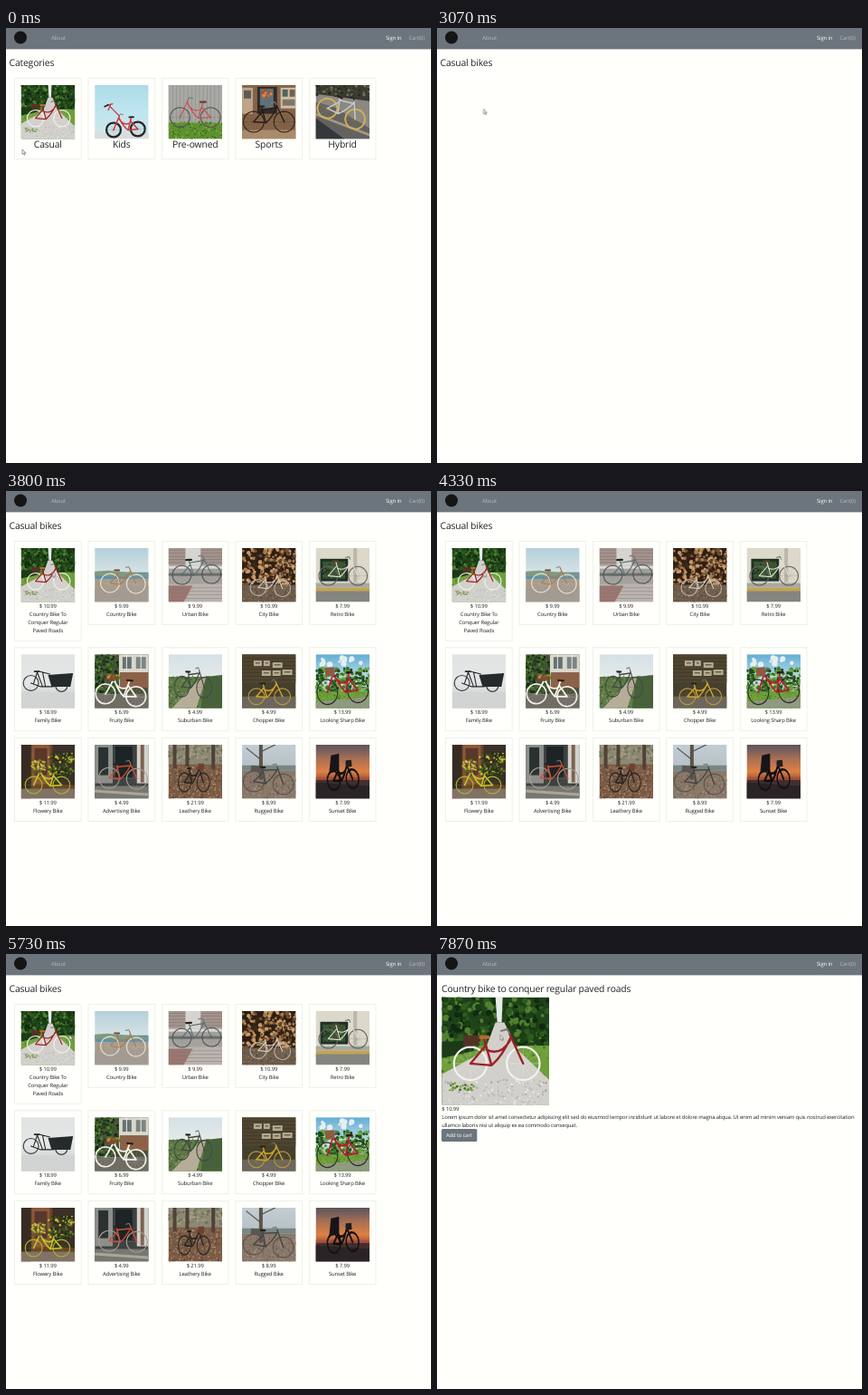
An HTML page that plays this animation: 470x480 px, repeating every 8000 ms.

```html
<!DOCTYPE html>
<html lang="en">
<head>
<meta charset="utf-8">
<title>Bike shop</title>
<style>
html, body { margin: 0; width: 100%; height: 100%; overflow: hidden; background: #fffffb; }
#stage { display: block; width: 470px; height: 480px; }
text { font: 5.92px "Open Sans", "Noto Sans", sans-serif; letter-spacing: -.025em; fill: #212529; text-rendering: geometricPrecision; }
.big { font-size: 10.4px; letter-spacing: -.017em; }
.mid { text-anchor: middle; }
.dim { fill: #b5babe; }
.lit { fill: #fff; }
.card { fill: none; stroke: #efefec; }
.page { visibility: hidden; animation: 8s step-end infinite; }
#home { animation-name: home; }
#title { animation-name: title; }
#list { animation-name: list; }
#item { animation-name: item; }
#cursor { animation: move 8s linear infinite; }
@keyframes home { 0% { visibility: visible } 38.375%, 100% { visibility: hidden } }
@keyframes title { 0% { visibility: hidden } 38.375% { visibility: visible } 74.125%, 100% { visibility: hidden } }
@keyframes list { 0% { visibility: hidden } 40% { visibility: visible } 74.125%, 100% { visibility: hidden } }
@keyframes item { 0% { visibility: hidden } 74.125%, 100% { visibility: visible } }
@keyframes move {
  0%, .875% { transform: translate(18px, 134px); animation-timing-function: ease-in-out }
  11.625%, 60% { transform: translate(51.5px, 89.5px); animation-timing-function: ease-in-out }
  70%, 100% { transform: translate(70px, 89.5px) }
}
</style>
</head>
<body>
<svg id="stage" viewBox="0 0 470 480">
  <rect width="470" height="480" fill="#fffffb"/>
  <rect width="470" height="23.4" fill="#6c757d"/>
  <circle cx="16" cy="10.5" r="7" fill="#151518"/>
  <text class="dim" x="50" y="13.3">About</text>
  <text class="lit" x="420" y="13.3">Sign in</text>
  <text class="dim" x="445.5" y="13.3">Cart(0)</text>
  <g id="home" class="page"><text class="big" x="3.5" y="42.4">Categories</text></g>
  <g id="title" class="page"><text class="big" x="3.5" y="42.4">Casual bikes</text></g>
  <g id="list" class="page"></g>
  <g id="item" class="page">
    <text class="big" x="5" y="42.4">Country bike to conquer regular paved roads</text>
    <text x="5.3" y="173">$ 10.99</text>
    <text x="5.3" y="182">Lorem ipsum dolor sit amet consectetur adipiscing elit sed do eiusmod tempor incididunt ut labore et dolore magna aliqua. Ut enim ad minim veniam quis nostrud exercitation</text>
    <text x="5.3" y="190.8">ullamco laboris nisi ut aliquip ex ea commodo consequat.</text>
    <rect x="5" y="193" width="39.3" height="14" rx="1.5" fill="#6c757d"/>
    <text class="lit" x="10" y="202.2">Add to cart</text>
  </g>
  <path id="cursor" d="M0 0V5.3L1.3 4.2 2.2 6.2 3.1 5.8 2.2 3.9H3.9Z" fill="#fff" stroke="#555" stroke-width=".6"/>
</svg>
<script>
const rect = (x, y, w, h, fill) => `<rect x="${x}" y="${y}" width="${w}" height="${h}" fill="${fill}"/>`;
const poly = (points, fill) => `<polygon points="${points}" fill="${fill}"/>`;
const line = (d, stroke, w) => `<path d="${d}" fill="none" stroke="${stroke}" stroke-width="${w}" stroke-linecap="round" stroke-linejoin="round"/>`;
const text = (x, y, s, cls) => `<text x="${x}" y="${y}" class="${cls}">${s}</text>`;

function fade(id, ...stops) {
  const steps = stops.map((c, i) => `<stop offset="${i / (stops.length - 1)}" stop-color="${c}"/>`).join('');
  return `<linearGradient id="${id}" x2="0" y2="1">${steps}</linearGradient>` + rect(0, 0, 60, 60, `url(#${id})`);
}

// Seeded dots for leaves, grass, gravel and logs.
function dots(n, x, y, w, h, r, colors) {
  let seed = n * 31 + x * 7 + y * 13 + 5, out = '';
  const rnd = () => (seed = (seed * 16807 + 11) % 2147483647) / 2147483647;
  rnd();
  for (let i = 0; i < n; i++) {
    out += `<circle cx="${(x + rnd() * w).toFixed(1)}" cy="${(y + rnd() * h).toFixed(1)}" r="${(r * (.5 + rnd() * .6)).toFixed(1)}" fill="${colors[i % colors.length]}"/>`;
  }
  return out;
}

const planks = (n, h, color) => Array.from({length: n}, (_, i) => rect(i * 60 / n, 0, .5, h, color)).join('');
const rows = (y, n, step, color) => Array.from({length: n}, (_, i) => rect(0, y + i * step, 60, .6, color)).join('');

// Bike from rear hub (x1, y1) to front hub (x2, y2), wheels of radius r; "tall" foreshortens it.
function bike(x1, y1, x2, y2, r, frame, tire, o = {}) {
  const s = Math.hypot(x2 - x1, y2 - y1) / 30, sy = s * (o.tall || 1);
  const turn = Math.atan2(y2 - y1, x2 - x1) * 180 / Math.PI;
  const R = r / s, seat = o.seat || '#2b211c', w = (o.w || 1.05) / s;
  const wheel = x => {
    let spokes = '';
    for (let a = 0; a < Math.PI; a += Math.PI / 6) {
      const dx = R * Math.cos(a), dy = R * Math.sin(a);
      spokes += `M${x - dx} ${-dy}L${x + dx} ${dy}`;
    }
    return `<g opacity=".35">${line(spokes, tire, .3)}</g><circle cx="${x}" r="${R}" fill="none" stroke="${tire}" stroke-width="${(o.tw || 1.1) / s}"/>`;
  };
  const top = o.diamond ? 'M8-12L22.5-14' : 'M9-8Q17-4 22.5-13';
  return `<g transform="translate(${x1} ${y1}) rotate(${turn}) scale(${s} ${x2 < x1 ? -sy : sy})">`
    + wheel(0) + wheel(30)
    + line(`M0 0L12 1L7.8-14M0 0L8.5-10M12 1Q18-4 23-15${top}M22.2-17L30 0`, frame, w)
    + line('M22.2-17L21-19.5L17.5-18.5', o.bar || '#777', 1)
    + line('M4.8-15H10', seat, 2)
    + (o.rack ? rect(-4, -16, 9, 6, o.rack) : '')
    + (o.basket ? rect(22, -20, 9, 7, o.basket) : '') + '</g>';
}

const leaf = ['#0f2a10', '#2c5c1e', '#527f30', '#1a3d15'];
const lawn = ['#3f7020', '#7fab42', '#5b912f'];

const casual = rect(0, 0, 60, 60, '#20431a') + dots(260, 0, 0, 60, 27, 1.7, leaf)
  + poly('30,0 34,0 33.5,14 31,14', '#e6ecea') + rect(0, 27, 60, 33, '#6f9f3c') + dots(90, 0, 27, 60, 18, 1, lawn)
  + poly('0,25 16,24 18,30 0,34', '#1d3a18')
  + poly('30,14 35,14 41,28 60,46 60,60 0,60 0,43 24,30', '#d2d0cb')
  + dots(160, 0, 46, 60, 14, .6, ['#aaa8a3', '#e9e8e4', '#bdbab4']) + dots(26, 4, 48, 14, 4, .7, lawn)
  + bike(16, 37, 45.5, 37, 9.2, '#9c2026', '#f3f2ee', {w: 1.2, seat: '#b86b2a', rack: '#513326'});

const kids = fade('kids', '#addbe8', '#bfe5ee', '#d1e8e9') + rect(0, 53, 60, 7, '#d7dedc')
  + bike(48, 49, 21, 50, 8, '#d7343d', '#24272a', {w: 1.5, tw: 2.3, seat: '#23252b'})
  + line('M27 34L17 24M13 23L20 21M15 28L18 21', '#c92e39', 1.2) + line('M11 24L15 22', '#252529', 1.7);

const owned = rect(0, 0, 60, 60, '#a8a9a5') + planks(14, 44, '#85877f') + rect(0, 42, 60, 18, '#5e9130')
  + dots(160, 0, 41, 60, 19, 1.1, lawn)
  + bike(47, 36, 13, 36, 11, '#cf474d', '#5b5550', {seat: '#703d30'});

const sports = rect(0, 0, 60, 60, '#846448') + rect(0, 3, 12, 29, '#bca58b') + rect(2, 6, 8, 9, '#5f5a50')
  + rect(17, 2, 22, 30, '#332a27') + rect(20, 4, 15, 22, '#627177') + rect(43, 3, 17, 23, '#cdbfaa')
  + rect(45, 5, 6, 8, '#53635f') + rect(53, 5, 6, 8, '#75604f') + rect(45, 16, 14, 7, '#827568')
  + dots(8, 23, 5, 9, 9, 2, ['#d13a22', '#e88536']) + rect(0, 50, 60, 10, '#a98a6b')
  + bike(13, 41, 47, 41, 11.5, '#241d1b', '#2d211c', {diamond: 1, w: 1.4});

const hybrid = rect(0, 0, 60, 60, '#8a8880') + poly('0,0 60,0 60,18 0,10', '#393b30')
  + dots(60, 0, 0, 60, 12, 1.6, ['#48472f', '#252923', '#777052']) + poly('0,19 20,24 60,48 60,60 0,60', '#63625e')
  + poly('0,37 32,60 0,60', '#34383a') + poly('0,31 60,54 60,57 0,34', '#a59a82')
  + bike(13, 26, 44, 38, 11, '#c4cac8', '#d2af59', {diamond: 1, tw: 1.8, w: 1.5, bar: '#1d2022'});

const country = fade('sky', '#b4d0dc', '#d9e4e4', '#d2d0c4') + rect(0, 27, 60, 8, '#5f90a8') + poly('0,26 15,25 60,29 60,32 0,31', '#7f9a84')
  + poly('0,35 60,34 60,60 0,60', '#a89a8a') + poly('0,46 60,42 60,60 0,60', '#a39b92')
  + bike(17, 39, 46, 40, 10.5, '#a87c50', '#e6dfd0', {seat: '#724631'});

const urban = rect(0, 0, 60, 60, '#a5a29e') + rect(0, 0, 60, 18, '#a3938d') + rows(2, 5, 3.5, '#857570')
  + rect(19, 0, 17, 20, '#d6d4d1') + rect(0, 20, 60, 3, '#dddbd7') + rect(0, 28, 60, 3, '#6d6f6e')
  + rect(0, 40, 60, 20, '#bab3ae') + poly('0,42 27,42 17,60 0,60', '#9a746c') + rows(44, 4, 4, '#8c8480')
  + bike(15, 30, 48, 29, 10.5, '#566c6c', '#4f5756', {diamond: 1});

const city = rect(0, 0, 60, 60, '#2c1d14') + dots(300, 0, 0, 60, 41, 2.1, ['#a67c50', '#c79d6a', '#74502f', '#3a2618'])
  + rect(0, 41, 60, 19, '#6e5c4b') + dots(110, 0, 42, 60, 18, .8, ['#927e65', '#4f4135'])
  + bike(18, 44, 45, 45, 9, '#d6d2c9', '#b8b2aa', {seat: '#8b4932'});

const retro = rect(0, 0, 60, 60, '#dcd9cb') + rect(5, 12, 31, 25, '#1f2f28') + rect(8, 15, 25, 19, '#3a5538')
  + dots(60, 8, 15, 25, 19, 1, leaf) + rect(42, 0, 4, 38, '#b9b8ac') + rect(0, 39, 60, 5, '#a6aaa2')
  + rect(0, 44, 60, 8, '#c2a455') + rect(0, 48, 60, 12, '#83867f')
  + bike(14, 31, 47, 31, 10.5, '#e6ded0', '#6a675e', {seat: '#633a23'});

const family = fade('wall', '#dfe3e2', '#e5e7e6', '#c6c9c8') + rect(0, 42, 60, 18, '#d2d4d3')
  + line('M11 32L22 36H34L44 35M14 32L18 20L24 36M20 19L32 22M24 20L27 35', '#202628', 1.1) + line('M15 19H20', '#202628', 1.8)
  + [[11, 32, 8.5], [45, 35, 6.5]].map(([x, y, r]) => `<circle cx="${x}" cy="${y}" r="${r}" fill="none" stroke="#394042" stroke-width="1.2"/>`).join('')
  + poly('30,23 58,21 55,36 34,36', '#252a2b');

const fruity = rect(0, 0, 60, 60, '#4a5238') + dots(170, 0, 0, 30, 45, 1.8, leaf) + rect(27, 0, 33, 35, '#d9d8cd')
  + rect(31, 3, 10, 13, '#667270') + rect(46, 3, 11, 13, '#7c8582') + rect(35, 0, 1, 17, '#eee') + rect(51, 0, 1, 17, '#eee')
  + rect(28, 20, 32, 17, '#8b6248') + rect(0, 44, 60, 16, '#6f6c64')
  + bike(46, 47, 12, 44, 11, '#f5f3ec', '#efede6', {w: 1.8, tw: 1.7, basket: '#754c34'}) + dots(18, 15, 22, 13, 5, 1.6, ['#9e3b2b', '#c79a3a', '#587b2d']);

const suburban = fade('field', '#d5e1e6', '#e6ebe8', '#98aa7a') + rect(0, 25, 60, 35, '#5f7a48')
  + dots(200, 0, 24, 60, 36, 1.1, ['#3f5a2c', '#83a058', '#5f8040']) + poly('36,26 42,26 31,60 4,60', '#b6ad98') + poly('42,25 60,23 60,60 36,60', '#47613a')
  + bike(15, 36, 40, 37, 8.5, '#40483f', '#444b43', {diamond: 1, tall: 1.35});

const chopper = rect(0, 0, 60, 60, '#453f2d') + rect(0, 0, 60, 32, '#4f442f') + rows(4, 7, 4, '#3a3426')
  + [[13, 7, 9], [24, 7, 7], [34, 9, 11], [22, 18, 10], [34, 18, 9], [45, 17, 11]].map(([x, y, w]) => rect(x, y, w, 6, '#b6ad90') + rect(x + 2, y + 2, w - 4, 1.4, '#655b44')).join('')
  + rect(0, 47, 60, 13, '#6d665a') + bike(16, 47, 45, 47, 9, '#d0a62b', '#b69a43', {w: 1.4});

const sharp = fade('day', '#62aed6', '#c9e2e6', '#65984b') + dots(14, 5, 4, 50, 9, 3, ['#e6eff0'])
  + dots(220, 0, 15, 60, 28, 2, ['#1f4a1c', '#3f7a2a', '#6ea53c']) + rect(0, 41, 60, 19, '#6fa23a')
  + dots(90, 0, 41, 60, 19, 1, lawn) + poly('0,53 60,47 60,60 0,60', '#8f9a7e')
  + bike(47, 40, 13, 42, 11.5, '#b51f2b', '#2f2e2e', {w: 1.7, tall: 1.2, basket: '#8c5b44'});

const flowery = rect(0, 0, 60, 60, '#6a412a') + rect(0, 0, 11, 60, '#372c24') + rect(12, 0, 20, 44, '#8b5939')
  + rect(15, 4, 14, 30, '#57382a') + rect(35, 0, 25, 45, '#3a3027') + rect(0, 49, 60, 11, '#827266')
  + bike(45, 45, 14, 45, 9.5, '#bbca28', '#a9b82d', {w: 1.6, basket: '#6c502d'})
  + dots(130, 30, 9, 28, 24, 1.5, ['#2c4a1a', '#d6b532', '#5c7a24', '#1f2f16']) + dots(40, 12, 17, 15, 11, 1.4, ['#c9c335', '#64852d', '#dcb74b']);

const advert = rect(0, 0, 60, 60, '#3e4141') + rect(0, 0, 20, 43, '#8c8e8b') + rect(4, 3, 11, 31, '#2b3131')
  + rect(23, 2, 19, 34, '#1c2425') + rect(47, 0, 13, 43, '#d4d2cb') + rect(51, 0, 4, 42, '#7c6153')
  + rect(0, 46, 60, 14, '#7a7771') + poly('0,50 60,54 60,57 0,53', '#aaa69d')
  + bike(16, 37, 47, 38, 11.5, '#cc4e36', '#a79d91', {diamond: 1, w: 1.4});

const leathery = rect(0, 0, 60, 60, '#7a5b46') + rect(0, 0, 60, 22, '#8d8873') + dots(90, 0, 0, 60, 18, 1.8, ['#6e7358', '#a09a81'])
  + [5, 19, 48].map(x => rect(x, 0, 4, 27, '#504237')).join('') + dots(300, 0, 24, 60, 36, 1, ['#a3785a', '#5d4535', '#b08a69'])
  + bike(18, 42, 39, 42, 7, '#2c2623', '#312d2a', {w: 1.3, tall: 1.5, basket: '#713f2d'});

const rugged = fade('lake', '#c3cdd4', '#b3bfc5', '#8a7e70') + rect(0, 23, 60, 6, '#788785') + rect(0, 29, 60, 31, '#8a7868')
  + dots(140, 0, 34, 60, 26, .9, ['#a59180', '#6b5d53']) + rect(19, 0, 4, 39, '#5d534b') + line('M21 8L37 0M20 16L5 4', '#5a504a', 1.2)
  + bike(13, 41, 46, 44, 11.5, '#454443', '#565250', {w: 1.4, diamond: 1, rack: '#5b5652'});

const sunset = fade('dusk', '#59545d', '#a66e55', '#df8043', '#733b2d', '#30262a') + rect(0, 39, 60, 21, '#43302e')
  + rect(0, 36, 60, 3, '#ac503c') + poly('0,42 60,46 60,60 0,60', '#2a2427')
  + bike(20, 40, 41, 38, 7, '#100f12', '#141216', {w: 1.8, tw: 1.6, tall: 1.5, basket: '#201c1c'}) + poly('17,12 26,10 26,29 15,31', '#17151a');

const photo = (x, y, size, art) => `<svg x="${x}" y="${y}" width="${size}" height="${size}" viewBox="0 0 60 60">${art}</svg>`;
const left = i => 9.5 + 81.45 * i;
const frame = (i, y, h, art) => `<rect class="card" x="${left(i)}" y="${y}" width="73.7" height="${h}"/>` + photo(left(i) + 7.2, y + 7.4, 59.5, art);
const add = (id, html) => document.getElementById(id).insertAdjacentHTML('beforeend', html);

const groups = [['Casual', casual], ['Kids', kids], ['Pre-owned', owned], ['Sports', sports], ['Hybrid', hybrid]];
add('home', groups.map(([name, art], i) => frame(i, 55.5, 89.2, art) + text(left(i) + 36.8, 132.3, name, 'big mid')).join(''));

const goods = [
  ['10.99', 'Country Bike To|Conquer Regular|Paved Roads', casual], ['9.99', 'Country Bike', country],
  ['9.99', 'Urban Bike', urban], ['10.99', 'City Bike', city], ['7.99', 'Retro Bike', retro],
  ['18.99', 'Family Bike', family], ['6.99', 'Fruity Bike', fruity], ['4.99', 'Suburban Bike', suburban],
  ['4.99', 'Chopper Bike', chopper], ['13.99', 'Looking Sharp Bike', sharp],
  ['11.99', 'Flowery Bike', flowery], ['4.99', 'Advertising Bike', advert], ['21.99', 'Leathery Bike', leathery],
  ['8.99', 'Rugged Bike', rugged], ['7.99', 'Sunset Bike', sunset]
];
add('list', goods.map(([price, name, art], n) => {
  const i = n % 5, y = [55.5, 172.8, 272.5][Math.floor(n / 5)], words = name.split('|');
  return frame(i, y, 83 + words.length * 8.9, art)
    + ['$ ' + price, ...words].map((s, k) => text(left(i) + 36.8, y + 73.6 + k * 8.88, s, 'mid')).join('');
}).join(''));

add('item', photo(5.3, 47.7, 118.7, casual));
</script>
</body>
</html>
```
